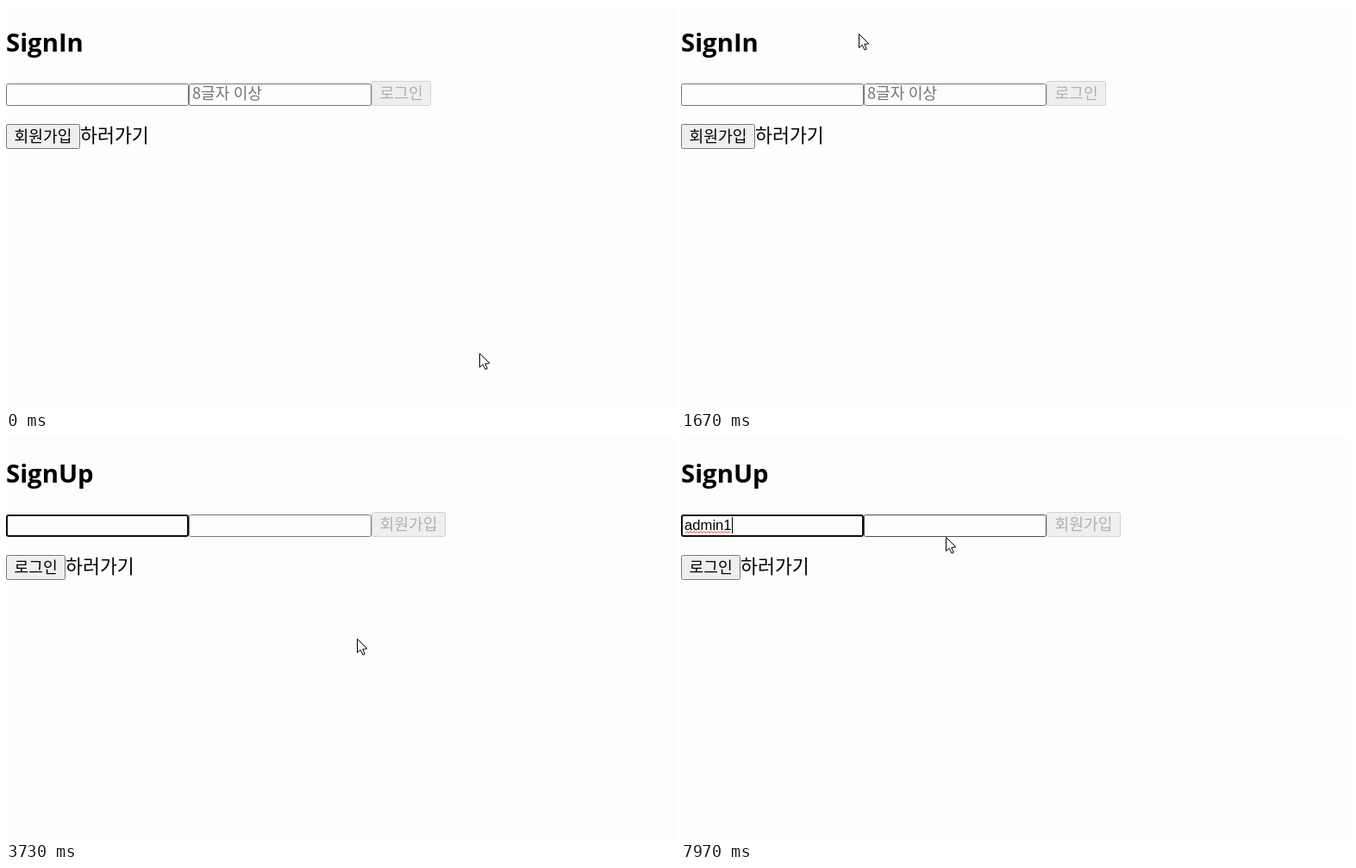
Recreate the animation shown at these times as an HTML page with a canvas. Size 776x468 px, loop 8 s.

```html
<!DOCTYPE html>
<html lang="ko">
<head>
<meta charset="utf-8">
<title>Sign in</title>
<style>
  html, body { margin: 0; width: 100%; height: 100%; overflow: hidden; background: #fdfdfd; }
  canvas { display: block; }
</style>
</head>
<body>
<canvas id="stage" width="776" height="468"></canvas>
<script>
const ctx = document.getElementById('stage').getContext('2d');
const LOOP = 8000;
const PAGE = '#fdfdfd';
const HANGUL = '"Noto Sans CJK KR", "Noto Sans CJK", sans-serif';
const LABEL = `300 18.2px ${HANGUL}`;
const BODY = `300 21.7px ${HANGUL}`;
const TITLE = 'bold 29.3px "Open Sans", "Noto Sans", sans-serif';
const TYPED = '16.67px "Liberation Sans", sans-serif';

const PRESS_AT = 2400, SIGN_UP_AT = 2530, FOCUS_AT = 3200, SQUIGGLE_AT = 7700, BLINK = 530;

// the pointer rests between moves
const home = { x: 549, y: 403 };
const moves = [
  { from: 0, to: 730, x: 78, y: 160 },
  { from: 730, to: 900, x: 257, y: 172 },
  { from: 1130, to: 1670, x: 206, y: 32 },
  { from: 1670, to: 2430, x: 42, y: 158 },
  { from: 2830, to: 3200, x: 150, y: 102 },
  { from: 3430, to: 3730, x: 407, y: 234 },
  { from: 7630, to: 7970, x: 307, y: 116 }
];

const word = 'admin1';
const keyTimes = [5300, 5370, 5900, 6000, 6200, 6870];

function pointerAt(t) {
  let { x, y } = home;
  for (const move of moves) {
    const u = Math.min(1, Math.max(0, (t - move.from) / (move.to - move.from)));
    const eased = u * u * (3 - 2 * u);
    x += (move.x - x) * eased;
    y += (move.y - y) * eased;
  }
  return { x: Math.round(x), y: Math.round(y) };
}

const inside = (p, x, y, w, h) => p.x >= x && p.x < x + w && p.y >= y && p.y <= y + h;

function text(str, x, y, font, color = '#000') {
  ctx.font = font;
  ctx.fillStyle = color;
  ctx.fillText(str, x, y);
}

function box(x, y, w, h, fill, stroke, line = 1) {
  ctx.beginPath();
  ctx.roundRect(x + line / 2, y + line / 2, w - line, h - line, 2);
  ctx.fillStyle = fill;
  ctx.fill();
  ctx.strokeStyle = stroke;
  ctx.lineWidth = line;
  ctx.stroke();
}

function input(x, focused, pointer) {
  const hover = inside(pointer, x, 90, 212, 26);
  box(x, 90, 212, 26, PAGE, focused ? '#101010' : hover ? '#505050' : '#767676', focused ? 2 : 1);
}

function disabledButton(label, x, y, w) {
  box(x, y, w, 29, '#efefef', '#d0d0d0');
  text(label, x + 9.5, y + 21, LABEL, '#b0b0b0');
}

function button(label, x, y, w, pointer, pressed) {
  const hover = inside(pointer, x, y, w, 29);
  box(x, y, w, 29, pressed ? '#f4f4f4' : hover ? '#e5e5e5' : '#efefef', '#767676');
  text(label, x + 9.5, y + 21, LABEL);
}

function typedField(t) {
  const count = keyTimes.filter(time => time <= t).length;
  const value = word.slice(0, count);
  const lastInput = count ? keyTimes[count - 1] : FOCUS_AT;
  text(value, 4, 108, TYPED);
  const end = 4 + ctx.measureText(value).width;
  if (t >= SQUIGGLE_AT) {
    ctx.beginPath();
    for (let x = 5; x <= end; x += 2) ctx.lineTo(x, x % 4 === 1 ? 111.5 : 109.5);
    ctx.strokeStyle = '#e03020';
    ctx.lineWidth = 1;
    ctx.stroke();
  }
  if (Math.floor((t - lastInput) / BLINK) % 2 === 0) {
    ctx.fillStyle = '#000';
    ctx.fillRect(Math.round(end), 93, 1, 19);
  }
}

function drawPointer(pointer) {
  ctx.save();
  ctx.translate(pointer.x + 0.5, pointer.y + 0.5);
  ctx.lineWidth = 1;
  ctx.strokeStyle = '#000';
  ctx.fillStyle = '#fff';
  if (inside(pointer, 2, 92, 420, 21)) {
    ctx.stroke(new Path2D('M-3-8h2l1 1l1-1h2M0-7V7M-3 8h2l1-1l1 1h2'));
  } else {
    const arrow = new Path2D('M0 0V16L3.7 12.7L6.5 18.5L8.8 17.5L6.2 12L11.3 11.3Z');
    ctx.fill(arrow);
    ctx.stroke(arrow);
  }
  ctx.restore();
}

function draw(t) {
  const pointer = pointerAt(t);
  const signUp = t >= SIGN_UP_AT;
  const focused = t >= FOCUS_AT;

  ctx.fillStyle = PAGE;
  ctx.fillRect(0, 0, 776, 468);
  text(signUp ? 'SignUp' : 'SignIn', 0, 53, TITLE);

  input(0, focused, pointer);
  input(212, false, pointer);
  if (signUp) {
    disabledButton('회원가입', 424, 87, 86);
    button('로그인', 0, 137, 69, pointer, false);
  } else {
    text('8글자 이상', 216, 108, LABEL, '#757575');
    disabledButton('로그인', 424, 87, 69);
    button('회원가입', 0, 137, 86, pointer, t >= PRESS_AT);
  }
  text('하러가기', signUp ? 69 : 86, 157.5, BODY);
  if (focused) typedField(t);
  drawPointer(pointer);
}

const start = performance.now();
function tick() {
  draw((performance.now() - start) % LOOP);
  requestAnimationFrame(tick);
}
tick();
</script>
</body>
</html>
```
